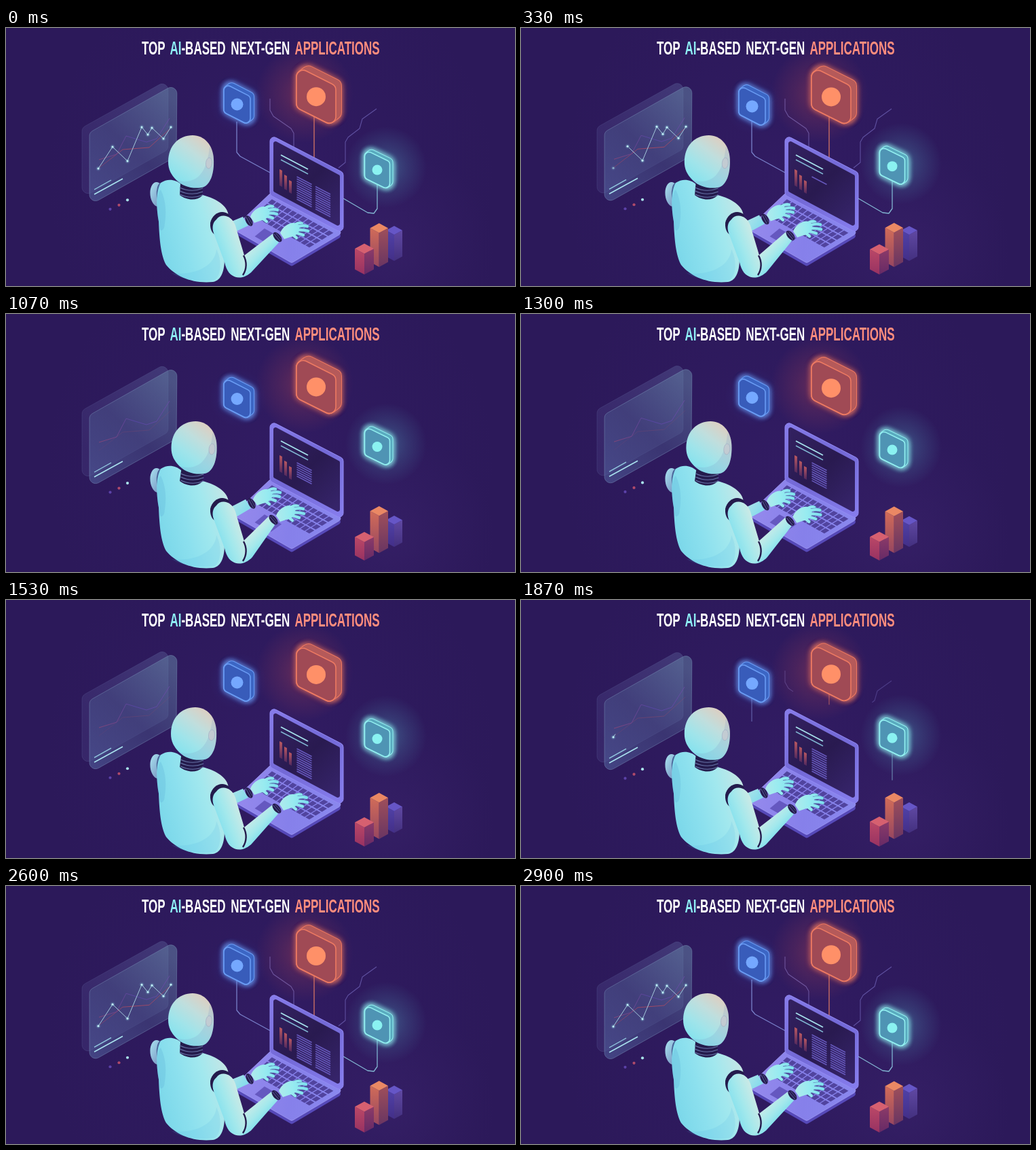
Animation, 750 px wide and 380 px high, one loop 2.93 s. Source, as an HTML page with a canvas:

```html
<!DOCTYPE html>
<html lang="en">
<head>
<meta charset="utf-8">
<title>Top AI-based next-gen applications</title>
<style>
html, body { margin: 0; width: 100%; height: 100%; overflow: hidden; background: #2c195a; }
canvas { position: absolute; left: 0; top: 0; display: block; }
h1 {
  position: absolute; left: 200px; top: 16px; margin: 0;
  font: bold 28px/28px "Liberation Sans", Arial, sans-serif;
  word-spacing: 5px; white-space: nowrap; color: #fff;
  text-transform: uppercase; transform: scaleX(.607); transform-origin: 0 0;
}
.cyan { color: #8eeef4; }
.coral { color: #ff8d7d; }
</style>
</head>
<body>
<canvas id="stage" width="750" height="380"></canvas>
<h1>Top <span class="cyan">AI</span>-based next-gen <span class="coral">applications</span></h1>
<script>
const ctx = document.getElementById('stage').getContext('2d');
const LOOP = 2930;
const KEYS = [0, 670, 1070, 1530, 2200, 2600];

const clamp = x => Math.max(0, Math.min(1, x));
const ramp = (t, a, b) => clamp((t - a) / (b - a));
const smooth = x => x * x * (3 - 2 * x);
const mix = (a, b, k) => [a[0] + (b[0] - a[0]) * k, a[1] + (b[1] - a[1]) * k];
const wave = t => (1 - Math.cos(2 * Math.PI * t / LOOP)) / 2;

// Smooth cyclic curve through one value per key time, without overshoot
function track(t, vals) {
  const n = KEYS.length;
  const at = i => {
    const turn = Math.floor(i / n), j = i - turn * n;
    return [KEYS[j] + turn * LOOP, vals[j]];
  };
  const slope = i => {
    const [p, a, b] = [at(i - 1), at(i), at(i + 1)];
    const s0 = (a[1] - p[1]) / (a[0] - p[0]), s1 = (b[1] - a[1]) / (b[0] - a[0]);
    return s0 * s1 > 0 ? 2 * s0 * s1 / (s0 + s1) : 0;
  };
  let i = n - 1;
  while (KEYS[i] > t) i--;
  const a = at(i), b = at(i + 1), d = b[0] - a[0], u = (t - a[0]) / d;
  const u2 = u * u, u3 = u2 * u;
  return a[1] + (b[1] - a[1]) * smooth(u) +
    d * ((u3 - 2 * u2 + u) * slope(i) + (u3 - u2) * slope(i + 1));
}

function linear(x0, y0, x1, y1, ...cols) {
  const g = ctx.createLinearGradient(x0, y0, x1, y1);
  cols.forEach((c, i) => g.addColorStop(i / (cols.length - 1), c));
  return g;
}

function glow(x, y, r, rgb, a) {
  const g = ctx.createRadialGradient(x, y, 0, x, y, r);
  g.addColorStop(0, `rgba(${rgb},${a})`);
  g.addColorStop(.5, `rgba(${rgb},${a * .45})`);
  g.addColorStop(1, `rgba(${rgb},0)`);
  ctx.fillStyle = g;
  ctx.fillRect(x - r, y - r, 2 * r, 2 * r);
}

function paint(fill, stroke, w = 1) {
  if (fill) { ctx.fillStyle = fill; ctx.fill(); }
  if (stroke) { ctx.strokeStyle = stroke; ctx.lineWidth = w; ctx.stroke(); }
}

function poly(pts, fill, stroke, w) {
  ctx.beginPath();
  pts.forEach(p => ctx.lineTo(...p));
  ctx.closePath();
  paint(fill, stroke, w);
}

function round(pts, r, fill, stroke, w) {
  const n = pts.length;
  ctx.beginPath();
  ctx.moveTo(...mix(pts[n - 1], pts[0], .5));
  pts.forEach((p, i) => ctx.arcTo(...p, ...pts[(i + 1) % n], r));
  ctx.closePath();
  paint(fill, stroke, w);
}

function shape(d, fill, stroke, w) {
  const p = new Path2D(d);
  if (fill) { ctx.fillStyle = fill; ctx.fill(p); }
  if (stroke) { ctx.strokeStyle = stroke; ctx.lineWidth = w; ctx.stroke(p); }
}

function oval(x, y, rx, ry, rot, fill, stroke, w) {
  ctx.beginPath();
  ctx.ellipse(x, y, rx, ry, rot, 0, 7);
  paint(fill, stroke, w);
}

function line(pts, color, w) {
  ctx.beginPath();
  pts.forEach(p => ctx.lineTo(...p));
  paint(null, color, w);
}

// Stroke the part of a polyline between fractions a and b; dots fade behind a
function part(pts, a, b, color, w, dot) {
  if (b <= 0) return;
  const lens = pts.slice(1).map((p, i) => Math.hypot(p[0] - pts[i][0], p[1] - pts[i][1]));
  const total = lens.reduce((s, l) => s + l, 0);
  const out = [], dots = [];
  let pos = 0;
  pts.forEach((p, i) => {
    const f = pos / total;
    if (f <= b + 1e-6) dots.push([p, clamp(1 - (a - f) / .45)]);
    if (i === lens.length) return;
    const k = lens[i] / total, s = Math.max(a, f), e = Math.min(b, f + k);
    if (e > s) out.push(mix(p, pts[i + 1], (s - f) / k), mix(p, pts[i + 1], (e - f) / k));
    pos += lens[i];
  });
  if (out.length) line(out, color, w);
  if (!dot) return;
  ctx.save();
  dots.forEach(([p, alpha]) => {
    ctx.globalAlpha = alpha;
    glow(p[0], p[1], 4, '140,225,240', .5);
    oval(p[0], p[1], 1.5, 1.5, 0, dot);
  });
  ctx.restore();
}

function backdrop() {
  ctx.fillStyle = '#2c195a';
  ctx.fillRect(0, 0, 750, 380);
  glow(390, 220, 330, '62,34,120', .28);
  glow(570, 325, 150, '68,42,120', .3);
}

function panels(t) {
  const y = 1 - 6 * wave(t);
  ctx.save();
  ctx.translate(0, y);
  round([[112, 146], [239, 75], [239, 178], [112, 249]], 9,
    linear(112, 200, 240, 110, 'rgba(78,68,138,.3)', 'rgba(92,98,155,.4)'), 'rgba(115,130,180,.2)');
  round([[123, 153], [252, 80], [251, 188], [123, 260]], 9,
    linear(123, 250, 252, 110, 'rgba(82,96,158,.6)', 'rgba(72,82,136,.48)', 'rgba(96,122,160,.58)'),
    'rgba(130,160,195,.4)', 1);

  const quiet = smooth(ramp(t, 700, 1000)) * (1 - smooth(ramp(t, 1750, 2150)));
  const low = [[137, 205], [172, 178], [211, 175], [242, 147]];
  const high = [[137, 193], [163, 185], [177, 158], [207, 167], [222, 162], [241, 132]];
  ctx.globalAlpha = .8 - .6 * quiet;
  line(low, linear(137, 0, 242, 0, '#7c406c', '#b84b5e', '#9c4668'), 1);
  ctx.globalAlpha = .85;
  line(high, linear(137, 0, 241, 0, '#8e4675', '#5846a8', '#6b4ba4'), 1);
  ctx.globalAlpha = 1;

  const zig = [[136, 206], [157, 174], [179, 195], [200, 145], [209, 156], [215, 146], [232, 162], [243, 145]];
  const erase = t < 1400 ? ramp(t, 150, 1000) : 0;
  const grow = t < 1400 ? 1 : ramp(t, 1850, 2550);
  if (erase < 1) part(zig, erase, grow, '#a3c7da', 1, '#c2f0f6');

  line([[130, 237], [155, 223]], '#93cbe0', 1.4);
  line([[130, 244], [172, 221]], '#a9e2ee', 1.6);
  ctx.restore();
  [[153.5, 266, '#5c42a8'], [166.5, 260, '#b04a6a'], [179, 252.5, '#a9e4ea']]
    .forEach(([x, cy, c]) => oval(x, cy + y * .85, 2.1, 2.1, 0, c));
}

function wires(t) {
  const wire = (pts, lag, color, w) => {
    const p = t < 1400 ? 1 - smooth(ramp(t, 520 + lag, 880 + lag)) : smooth(ramp(t, 1680, 2120));
    ctx.globalAlpha = .35 + .6 * p;
    part(pts, 0, p, color, w);
  };
  wire([[340, 138], [340, 183], [345, 189], [389, 213]], 120, '#7d86cf', 1.3);
  wire([[389, 104], [389, 121], [394, 130], [420, 148], [424, 155], [424, 178]], 0, '#6a5aa8', 1.1);
  wire([[454, 130], [454, 191]], 120, '#d27464', 1.4);
  wire([[546, 119], [525, 134], [521, 148], [504, 161], [500, 168], [500, 198], [490, 206]], 0, '#6154a4', 1.1);
  wire([[547, 226], [547, 266], [542, 273], [533, 272], [497, 251]], 120, '#86bcd6', 1.3);
  ctx.globalAlpha = 1;
}

function tile(x, y, w, h, skew, dx, dy, fill, side, edge, mark, r) {
  const face = [[x, y], [x + w, y + skew], [x + w, y + skew + h], [x, y + h]];
  const corner = w * .17;
  const layer = k => face.map(p => [p[0] + dx * k, p[1] - dy * k]);
  const depths = [1, .8, .6, .4, .2, 0];
  ctx.save();
  ctx.shadowColor = edge;
  ctx.shadowBlur = 8;
  depths.forEach(k => round(layer(k), corner, null, edge, 2));
  ctx.restore();
  depths.forEach(k => round(layer(k), corner, side));
  round(face, corner, fill, edge, 1.6);
  oval(x + w / 2, y + (skew + h) / 2, r, r, 0, mark);
}

function tiles(t) {
  const by = 9 * wave((t - 130 + LOOP) % LOOP);
  const ry = track(t, [0, 8, 12.5, 9, 12, 5]);
  const ey = track(t, [0, -12, -13.5, -4.5, -7, -4]);
  glow(440, 97 + by, 72, '190,72,82', .4);
  glow(342, 111 + ry, 42, '60,96,210', .16);
  glow(560, 205 + ey, 60, '84,170,196', .42);
  tile(428, 56 + by, 58, 61, 29, 8, 6, '#a04a55', '#b55a5a', '#ee7a62', '#ff9068', 14);
  tile(321, 81 + ry, 39, 43, 20, 5, 4, '#385cba', '#3c66c4', '#6a9cf4', '#75a8ff', 9);
  tile(528.5, 179 + ey, 37, 42, 18, 4, 3, '#4f94b4', '#5aabbf', '#92eff0', '#8af2f1', 7.5);
}

const DECK = [[390, 243], [497, 301], [421, 346], [334, 296]];
const deck = (u, v) => mix(mix(DECK[0], DECK[1], u), mix(DECK[3], DECK[2], u), v);
const patch = (u, v, du, dv) => [deck(u, v), deck(u + du, v), deck(u + du, v + dv), deck(u, v + dv)];

function textColumn(x, y, count) {
  for (let i = 0; i < Math.floor(count); i++) {
    line([[x, y + i * 3.3], [x + 22, y + 11.5 + i * 3.3]], '#6658bc', 1.6);
  }
}

function laptop(t) {
  round(DECK.map(p => [p[0], p[1] + 5]), 4, '#5649b8');
  round(DECK, 4, linear(350, 290, 490, 310, '#9388ec', '#8680ea', '#8a88ee'), '#a19cf6', .8);
  for (let r = 0; r < 4; r++) {
    for (let c = 0; c < 12; c++) {
      poly(patch(.07 + c * .073, .1 + r * .125, .06, .1), '#51449f');
    }
  }
  poly(patch(.31, .68, .27, .23), '#6558c0');

  round([[389, 157], [497, 213], [497, 303], [389, 246]], 6,
    linear(389, 160, 497, 290, '#877cea', '#7369d6', '#857cec'), '#938af4', 1);
  round([[394, 165], [492, 217], [492, 293], [394, 241]], 3,
    linear(394, 180, 492, 280, '#32205f', '#291a50', '#36246a'));
  line([[405, 187], [445, 208]], '#a6e2ec', 1.8);
  line([[405, 194], [445, 215]], '#7fb4d0', 1.5);
  [[403, 208, 24], [410, 216, 21], [417, 224, 18]].forEach(([x, y, h]) =>
    poly([[x, y], [x + 4, y + 2], [x + 4, y + h + 2], [x, y + h]],
      linear(0, y, 0, y + h, '#bb5860', '#5a2d5e')));
  const full = t < 200;
  textColumn(428.5, 219, full ? 11 : 11 * ramp(t, 200, 1500));
  textColumn(456, 233.5, full ? 11 : 11 * ramp(t, 1850, 2500));
}

function column(x, w, top, base, light, left, right) {
  const m = x + w / 2, d = w * .27;
  poly([[x, top + d], [m, top + 2 * d], [m, base], [x, base - d]], linear(0, top, 0, base, ...left));
  poly([[x + w, top + d], [m, top + 2 * d], [m, base], [x + w, base - d]], linear(0, top, 0, base, ...right));
  poly([[m, top], [x + w, top + d], [m, top + 2 * d], [x, top + d]], light);
}

function columns(t) {
  column(560, 24, track(t, [291.5, 292, 297, 298, 298, 294]), 343, '#6656c6', ['#5244ac', '#432f88'], ['#644ca8', '#43307f']);
  column(536.5, 26.5, track(t, [287.5, 286, 283, 284, 284, 287]), 352, '#ea8864', ['#d87058', '#964660'], ['#a5525a', '#693562']);
  column(514, 28, track(t, [317.5, 320, 321, 320, 318, 317.5]), 363, '#d66070', ['#c24c68', '#973262'], ['#933e69', '#662a66']);
}

const NAVY = '#241b4c';

function hand(x, y, tips) {
  ctx.save();
  ctx.translate(x, y);
  ctx.lineCap = 'round';
  const skin = linear(-16, 0, 26, 0, '#b0eaec', '#98ebf0', '#7fe0f0');
  tips.forEach(([tx, ty], i) => {
    ctx.beginPath();
    ctx.moveTo(0, -2 + i * 1.4);
    ctx.quadraticCurveTo(tx * .6, ty - 3, tx, ty);
    paint(null, '#5874ac', 5.2);
    paint(null, skin, 4.2);
  });
  shape('M-15 4C-12-4-4-11 5-11C13-10 15-3 12 3C8 9-2 10-9 13Z', skin);
  ctx.restore();
}

function cuff(x, y, rot) {
  ctx.save();
  ctx.translate(x, y);
  ctx.rotate(rot);
  oval(0, 0, 4.6, 8.5, 0, NAVY);
  line([[-1, -7], [-1, 7]], '#5a5a96', 1);
  line([[2, -6], [2, 6]], '#4a4680', 1);
  ctx.restore();
}

function robot(t) {
  const lx = track(t, [0, 4, 4, 0, 0, 1]), ly = track(t, [0, -5, -5, 0, 0, 0]);
  const rx = track(t, [0, -6, -6, -1, 0, -2]), ry = track(t, [0, -5, -5, -1, 0, 0]);
  const hx = track(t, [0, 4, 4.5, 4, 0, 0]);

  poly([[320, 290], [349 + lx, 278 + ly], [357 + lx, 291 + ly], [334, 302]],
    linear(320, 285, 345, 302, '#b9e6e8', '#88dcec'));
  cuff(358 + lx, 284 + ly, -.5);
  hand(375 + lx, 274 + ly, [[18, -11], [25, -6], [24, 0], [18, 6], [9, 11]]);

  oval(223, 245, 10.5, 18, -.1, linear(213, 240, 232, 250, '#9fd2e6', '#7896c4'));
  oval(230, 247, 8, 19, -.1, '#4a6398');
  shape('M228 228C238 221 250 223 258 230L290 246C312 252 326 262 328 276L318 300L322 340C322 356 318 372 305 374C275 377 250 366 236 349C228 335 226 310 225 285C221 262 221 240 228 228Z',
    linear(222, 300, 326, 270, '#7cd8ea', '#8ce0ee', '#a2e8ee', '#c4e6e6'));
  shape('M228 238C236 254 237 274 233 294C229 302 226 299 225 285C221 262 222 245 228 238Z', 'rgba(80,160,210,.2)');
  shape('M244 361C262 372 286 374 307 371C318 365 318 340 310 326C308 350 280 365 244 361Z', 'rgba(70,170,215,.14)');

  // Neck, leaning with the head
  const n = hx * .3;
  shape(`M${257 + n} 229L${290 + n} 229L289 247C281 255 266 254 256 246Z`, NAVY);
  for (let i = 0; i < 3; i++) {
    shape(`M${256 + n} ${235 + i * 5}Q${273 + n} ${243 + i * 5} ${290 + n} ${236 + i * 5}`, null, '#6672a6', 1.2);
  }

  // Right arm
  shape('M301 287C304 273 318 266 329 275L319 304C309 309 300 302 301 287Z', NAVY);
  const ax = 393 + rx, ay = 303 + ry;
  shape(`M342 342L${ax} ${ay}L${ax + 9} ${ay + 13}L363 358C354 368 340 371 332 363Z`,
    linear(355, 330, 378, 352, '#c6ebe8', '#a2e8ec', '#76dcee'));
  shape('M310 282C317 272 333 276 338 291L352 338C357 352 351 363 342 366C331 367 325 358 322 345L306 302C303 293 305 286 310 282Z',
    linear(305, 325, 345, 310, '#7cdeee', '#a2e8ec', '#cbeae6'));
  shape('M350 335C355 344 355 355 349 364', null, NAVY, 2.4);
  cuff(400 + rx, 308 + ry, -.7);
  hand(419 + rx, 298 + ry, [[17, -10], [25, -6], [26, 1], [19, 7], [9, 11]]);

  ctx.save();
  ctx.translate(hx, 0);
  const skull = 'M239 197C239 173 255 158 275 158C292 158 305 172 306 193C307 214 301 233 288 235C275 237 261 234 251 224C243 216 239 208 239 197Z';
  shape(skull, linear(246, 224, 292, 163, '#83e2ee', '#a0e4ea', '#c0dedd', '#dccfc2'));
  shape('M306 193C307 214 301 233 288 235C275 237 261 234 251 224C276 231 296 220 300 174C304 180 306 186 306 193Z', 'rgba(120,150,195,.2)');
  oval(299, 199, 4.5, 8, .1, '#c2cbd2', '#a3afc4', .7);
  ctx.restore();
}

function draw(t) {
  backdrop();
  panels(t);
  wires(t);
  tiles(t);
  columns(t);
  laptop(t);
  robot(t);
}

let start;
function tick(now) {
  start ??= now;
  draw(Math.max(0, now - start) % LOOP);
  requestAnimationFrame(tick);
}
ctx.lineJoin = 'round';
draw(0);
requestAnimationFrame(tick);
</script>
</body>
</html>
```
